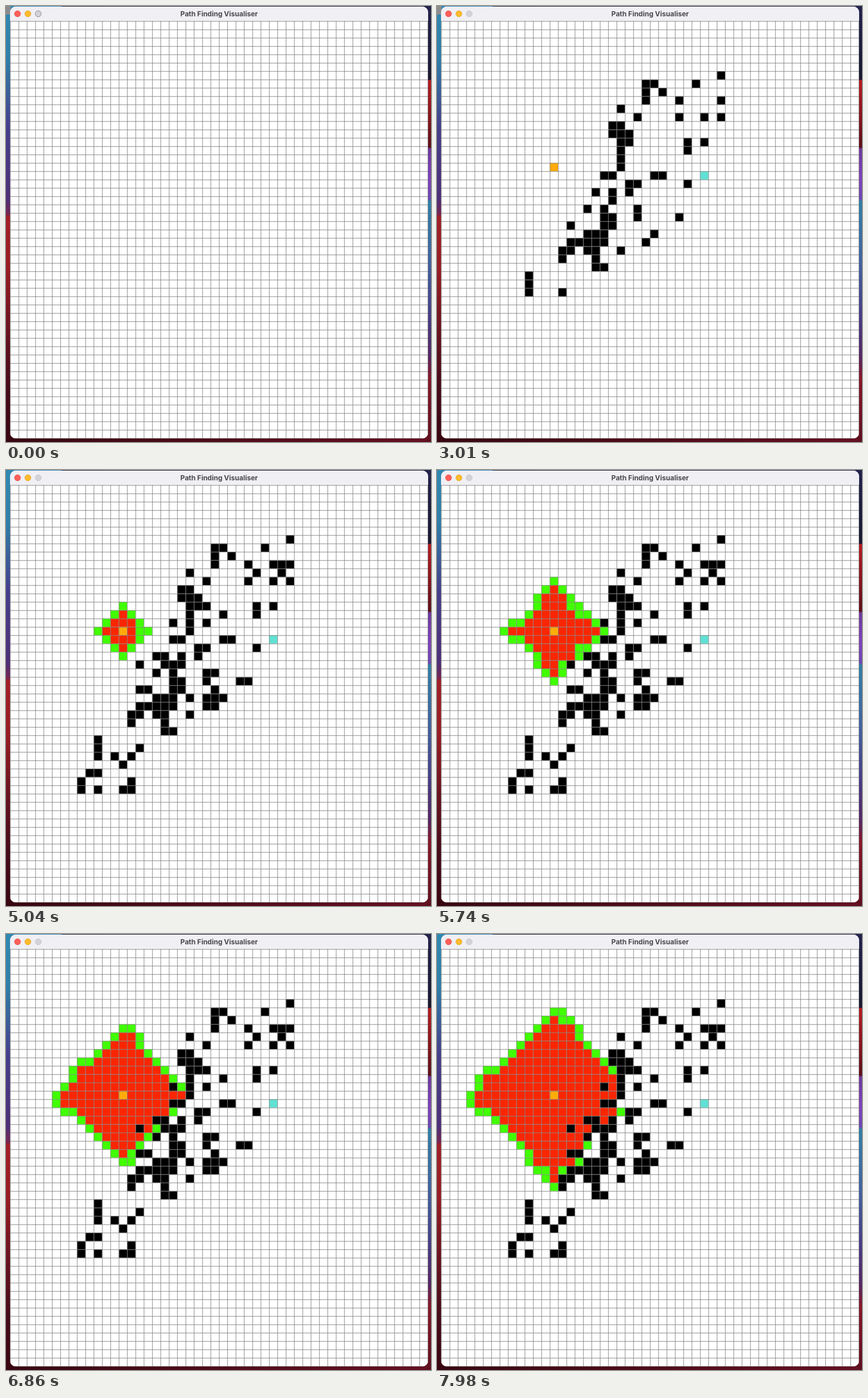
These frames come from a looping animation (738 px wide and 758 px high, 8 s). An HTML page with a canvas:

```html
<!DOCTYPE html>
<html lang="en">
<head>
<meta charset="utf-8">
<title>Path Finding Visualiser</title>
<style>
  html, body { margin: 0; width: 100%; height: 100%; overflow: hidden; }
  canvas { position: absolute; left: 0; top: 0; }
  #title {
    position: absolute; left: 7px; top: 1px; width: 726px; line-height: 25px;
    text-align: center; color: #4b484d; font: 700 12px/25px Inter, sans-serif;
  }
</style>
</head>
<body>
<canvas id="stage" width="738" height="758"></canvas>
<div id="title">Path Finding Visualiser</div>
<script>
const ctx = document.getElementById('stage').getContext('2d');
const LOOP = 8000, TICK = 70, SIZE = 50, PITCH = 14.5, LEFT = 7.3, TOP = 26.3;
const START = 1713, END = 1831;          // cells are row * 100 + column
const col = cell => cell % 100, row = cell => Math.floor(cell / 100);

// A wall is painted by slow strokes (line) and fast ones that skip cells (dots)
const walls = new Set();
function dots(...cells) { cells.forEach(c => walls.add(c)); }
function line(from, ...points) {
  for (const to of points) {
    const dr = row(to) - row(from), dc = col(to) - col(from);
    const n = Math.max(Math.abs(dr), Math.abs(dc));
    for (let k = 0; k <= n; k++) walls.add(from + Math.round(dr * k / n) * 100 + Math.round(dc * k / n));
    from = to;
  }
}

// down the middle
line(1322, 1321, 1521);
dots(1721, 1820, 2020);
line(2219, 2519, 2618);
dots(2818, 2918, 2919);
// back up and over the top
line(2718, 2518);
dots(2420, 2320, 2120, 1819, 1621);
line(1422, 1220, 1320, 1221);
dots(1021, 1123);
line(924, 724, 725, 826);
// around the goal
dots(1128, 928, 730, 633, 933, 1133, 1131, 1431, 1429, 1529, 1929, 2328);
dots(2525, 2624, 2721, 2323, 2223);
line(2022, 1922, 1923);
// lower left
dots(1825, 1826, 2018, 2217, 2415);
line(2517, 2717);
line(2619, 2615);
line(2715, 2714, 2814);
line(3010, 3210);
dots(3214);
// filling gaps
line(931, 932, 1032);
dots(1029, 1525, 1423, 1623, 1619, 2017, 2115, 2118, 2119, 2416, 2327, 2224);
line(2424, 2524, 2523, 2623);
dots(2521);
line(3115, 3313, 3212);
line(3410, 3409, 3508, 3608);
dots(3610);
line(3613, 3614, 3514);

// Binary heap of [distance, cell]; among equal entries the right child wins
const heap = [];
function rise(item, i) {
  while (i > 0) {
    const parent = (i - 1) >> 1;
    if (item[0] >= heap[parent][0]) break;
    heap[i] = heap[parent];
    i = parent;
  }
  heap[i] = item;
}
function pop() {
  const last = heap.pop();
  if (!heap.length) return last;
  const top = heap[0];
  let i = 0;
  for (let child = 1; child < heap.length; child = 2 * i + 1) {
    const right = child + 1;
    if (right < heap.length && heap[child][0] >= heap[right][0]) child = right;
    heap[i] = heap[child];
    i = child;
  }
  rise(last, i);
  return top;
}

function neighbours(cell) {
  return [cell + 1, cell - 1, cell + 100, cell - 100].filter(n =>
    n >= 0 && n < SIZE * 100 && col(n) < SIZE && !walls.has(n));
}

// Dijkstra's algorithm: cells in the order they leave the heap
function searchOrder() {
  const seen = new Set([START]), order = [];
  heap.push([0, START]);
  while (heap.length) {
    const [dist, cell] = pop();
    order.push(cell);
    for (const n of neighbours(cell)) {
      if (seen.has(n)) continue;
      seen.add(n);
      rise([dist + 1, n], heap.length);
    }
  }
  return order;
}
const wallOrder = [...walls], order = searchOrder();

const wallCount = t => t < 1190 ? 0 : Math.round(14 + (t - 1470) * 0.037);
const searchCount = t => t < 4830 ? 0 : Math.round(13 + (t - 5040) * 0.0551);

function rect(color, x, y, w, h) {
  ctx.fillStyle = color;
  ctx.fillRect(x, y, w, h);
}

function fillCell(cell, color) {
  rect(color, LEFT + PITCH * col(cell), TOP + PITCH * row(cell), PITCH, PITCH);
}

function strip(x, y, w, h, stops) {
  const g = w > h ? ctx.createLinearGradient(x, 0, x + w, 0) : ctx.createLinearGradient(0, y, 0, y + h);
  const len = Math.max(w, h);
  for (const [at, color] of stops) g.addColorStop(at / len, color);
  rect(g, x, y, w, h);
}

function wallpaper(t) {
  strip(0, 0, 20, 758, [[0, '#3189b0'], [90, '#2f7fa9'], [210, '#463f8b'], [335, '#4e2f78'],
    [361, '#742552'], [367, '#a22027'], [460, '#971c23'], [560, '#6b1420'], [660, '#480b19'], [758, '#380610']]);
  strip(718, 0, 20, 758, [[0, '#23234d'], [128, '#17172f'], [129, '#b31d21'], [246, '#5d0f19'],
    [248, '#6d3a9e'], [300, '#7d42b8'], [336, '#6a48b0'], [339, '#2f80a6'], [450, '#41609f'],
    [540, '#463b86'], [610, '#552661'], [645, '#861728'], [758, '#5f0f20']]);
  strip(20, 0, 698, 14, [[0, '#3189b0'], [76, '#2f7fa9'], [77, '#1b1b40'], [698, '#23234d']]);
  strip(8, 740, 722, 18, [[0, '#380610'], [722, '#640f22']]);
  if (t < 4130) rect('#8c8c8f', 0, 0, 8, 15);
}

function button(x, fill, edge) {
  ctx.beginPath();
  ctx.arc(x, 13.5, 5.2, 0, 7);
  ctx.fillStyle = fill;
  ctx.fill();
  ctx.strokeStyle = edge;
  ctx.lineWidth = 0.8;
  ctx.stroke();
}

function draw(t) {
  wallpaper(t);
  ctx.save();
  ctx.beginPath();
  ctx.roundRect(7, 1, 726, 751, 10);
  ctx.fillStyle = '#fff';
  ctx.fill();
  ctx.clip();
  rect('#f0eff4', 7, 0, 726, 26);

  wallOrder.slice(0, wallCount(t)).forEach(c => fillCell(c, '#000'));
  // The newest cell stays open until the next one is taken
  const taken = order.slice(0, searchCount(t)), closed = new Set(taken.slice(0, -1));
  const open = new Set(taken.flatMap(neighbours).filter(c => !closed.has(c)));
  open.forEach(c => fillCell(c, '#40ff00'));
  closed.forEach(c => fillCell(c, '#fa2600'));
  if (t >= 490) fillCell(START, '#ffab0a');
  if (t >= 1120) fillCell(END, '#62e0d4');

  for (let i = 0; i <= SIZE; i++) {
    rect('#808080', LEFT + PITCH * i, 26, 0.9, 726);
    rect('#808080', 7, TOP + PITCH * i, 726, 0.9);
  }
  ctx.restore();

  button(20, '#fe5f58', '#e14640');
  button(38, '#febb2e', '#dfa023');
  button(56, '#d5d3d8', t < 70 ? '#77757a' : '#c2c0c5');
}

function frame(now) {
  draw(Math.floor(now % LOOP / TICK) * TICK);
  requestAnimationFrame(frame);
}
draw(0);
requestAnimationFrame(frame);
</script>
</body>
</html>
```
